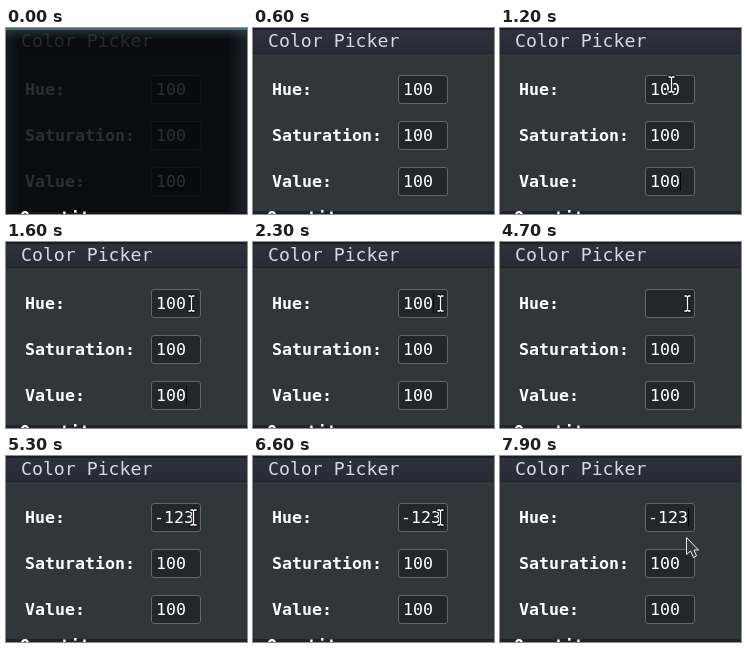
Animation of 241 by 186 pixels, one loop 8000 ms. Source, as an HTML page:

```html
<!DOCTYPE html>
<html>
<head>
<meta charset="utf-8">
<style>
  html, body { margin: 0; width: 100%; height: 100%; overflow: hidden; background: #313639; }
  svg { display: block; width: 241px; height: 186px; }
  text { font-family: "DejaVu Sans Mono", "Noto Sans Mono", monospace; font-size: 16.6px; fill: #fff; white-space: pre; }
  .title { font-size: 18.2px; fill: #d3dae3; }
  .label { font-weight: bold; }
</style>
</head>
<body>
<svg id="stage" viewBox="0 0 241 186">
  <defs>
    <linearGradient id="bar" x2="0" y2="1">
      <stop offset="0" stop-color="#2f323d"/>
      <stop offset="1" stop-color="#282b35"/>
    </linearGradient>
    <linearGradient id="glow" x2="0" y2="1">
      <stop offset="0" stop-color="#536970" stop-opacity=".4"/>
      <stop offset="1" stop-color="#536970" stop-opacity="0"/>
    </linearGradient>
    <linearGradient id="side">
      <stop offset="0" stop-color="#26303a" stop-opacity=".4"/>
      <stop offset=".06" stop-color="#26303a" stop-opacity="0"/>
      <stop offset=".92" stop-color="#26303a" stop-opacity="0"/>
      <stop offset="1" stop-color="#26303a" stop-opacity=".6"/>
    </linearGradient>
    <clipPath id="inner"><rect x="148" y="48" width="41" height="28"/></clipPath>
  </defs>
  <rect width="241" height="186" fill="#313639"/>
  <rect width="241" height="26" fill="url(#bar)"/>
  <rect width="241" height="2" fill="#1d1f27"/>
  <rect y="25" width="241" height="1" fill="#20232b"/>
  <text class="title" x="15" y="19">Color Picker</text>
  <g id="rows"></g>
  <rect y="183" width="241" height="3" fill="#20232b"/>
  <g id="dim">
    <rect width="241" height="186" fill="#030506" fill-opacity=".84"/>
    <rect width="241" height="186" fill="url(#side)"/>
    <rect width="241" height="12" fill="url(#glow)"/>
    <rect width="241" height="2" fill="#526a73"/>
    <rect y="184" width="241" height="2" fill="#1b151d"/>
  </g>
  <text class="label" x="14" y="195">Quantity</text>
  <path id="arrow" d="M.5 .5V17.5L4.5 14L7.5 20.5L10.5 19L8 13H12.5Z" fill="#353a3e" stroke="#eef0f1"/>
  <g id="beam" fill="none" stroke-linecap="square">
    <path d="M-2.5-7.5H-1L0-6.5L1-7.5H2.5M0-6.5V6.5M-2.5 7.5H-1L0 6.5L1 7.5H2.5" stroke="#111" stroke-width="3.4"/>
    <path d="M-2.5-7.5H-1L0-6.5L1-7.5H2.5M0-6.5V6.5M-2.5 7.5H-1L0 6.5L1 7.5H2.5" stroke="#fff" stroke-width="1.3"/>
  </g>
</svg>
<script>
const LOOP = 8000;
const $ = id => document.getElementById(id);
const show = (el, on) => el.setAttribute("visibility", on ? "visible" : "hidden");

$("rows").innerHTML = ["Hue:", "Saturation:", "Value:"].map((name, i) => {
  const y = 46 * i;
  return `<text class="label" x="19" y="${67 + y}">${name}</text>
    <rect x="145.5" y="${47.5 + y}" width="49" height="28" rx="2.5" fill="#23272a" stroke="#60666a"/>
    <g ${i ? "" : 'clip-path="url(#inner)"'}><text id="value${i}" x="150" y="${67 + y}">100</text></g>
    <rect id="caret${i}" x="180" y="${52 + y}" width="1" height="19" fill="#050505"/>`;
}).join("");

// [start, text]
const typing = [[0, "100"], [2600, "10"], [2800, "1"], [3500, ""],
  [5000, "-1"], [5100, "-12"], [5300, "-123"]];

// [start, shape, x, y]
const pointer = [[0, "", 0, 0],
  [900, "arrow", 225, 39], [1000, "arrow", 204, 38],
  [1100, "beam", 180, 52], [1200, "beam", 171, 56],
  [1300, "beam", 172, 58], [1400, "beam", 176, 59],
  [1500, "beam", 181, 60], [1600, "beam", 185, 61],
  [1700, "beam", 187, 61], [7500, "beam", 188, 66],
  [7600, "arrow", 187, 79], [7700, "arrow", 186, 86],
  [7900, "arrow", 186, 81]];

const at = (keys, t) => keys.filter(k => k[0] <= t).pop();
const within = (t, a, b) => t >= a && t < b;

function draw(t) {
  show($("dim"), t < 600);

  const text = at(typing, t)[1];
  const scroll = Math.max(0, text.length * 10 - 38);
  $("value0").textContent = text;
  $("value0").setAttribute("x", 150 - scroll);
  $("caret0").setAttribute("x", 150 + text.length * 10 - scroll);
  show($("caret0"), within(t, 2300, 4700) || within(t, 5300, 6600) || t >= 7500);
  show($("caret1"), false);
  show($("caret2"), within(t, 700, 1800));

  const [, shape, x, y] = at(pointer, t);
  for (const id of ["arrow", "beam"]) {
    show($(id), id === shape);
    const half = id === "beam" ? 0.5 : 0;
    $(id).setAttribute("transform", `translate(${x + half} ${y + half})`);
  }
}

function tick() {
  draw(performance.now() % LOOP);
  requestAnimationFrame(tick);
}
tick();
</script>
</body>
</html>
```
